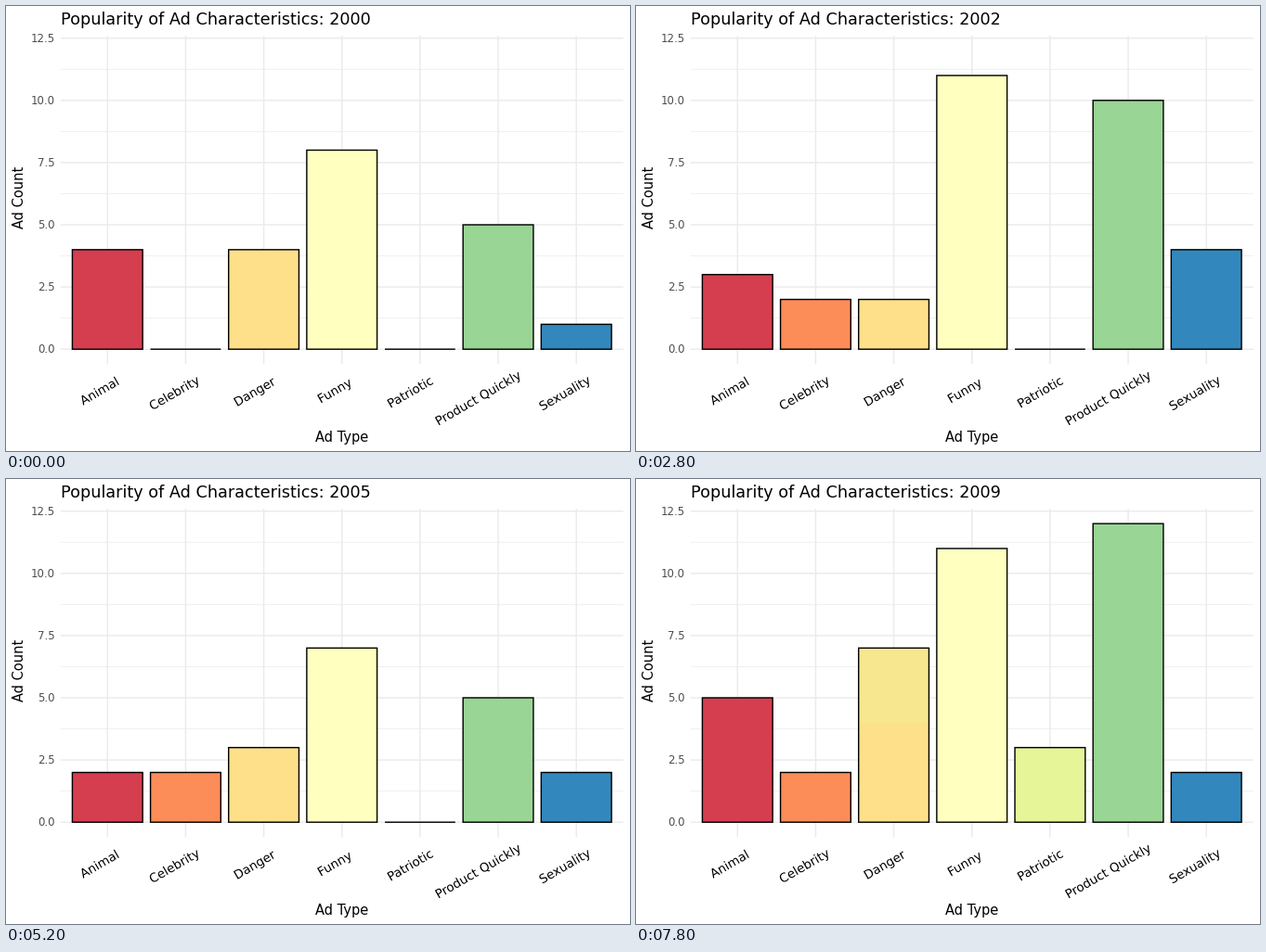
These frames come from a looping animation (672 px wide and 480 px high, 8000 ms). A matplotlib script:

```python
import matplotlib.pyplot as plt
from matplotlib.animation import FuncAnimation
from matplotlib.patches import PathPatch, Rectangle
from matplotlib.textpath import TextPath
from matplotlib.transforms import Affine2D

W, H, DPI = 672, 480, 96
PX = 72 / DPI
STEP, LOOP = 200, 8000
LEFT, RIGHT, TOP, BOTTOM = 58.8, 664.7, 32, 386.3
ZERO, UNIT = 370.2, 26.84
PITCH = (RIGHT - LEFT) / 7.2
BAR = 0.9 * PITCH

TYPES = ["Animal", "Celebrity", "Danger", "Funny", "Patriotic",
         "Product Quickly", "Sexuality"]
COLORS = ["#D53E4F", "#FC8D59", "#FEE08B", "#FFFFBF", "#E6F598",
          "#99D594", "#3288BD"]
# start of the bars, start of the year in the title, ad counts
YEARS = [
    (0, 0, (4, 0, 4, 8, 0, 5, 1)),
    (1000, 1200, (3, 6, 4, 10, 1, 4, 6)),
    (2000, 2000, (3, 2, 3, 10, 1, 7, 6)),
    (2800, 3000, (3, 2, 2, 11, 0, 10, 4)),
    (3600, 3800, (6, 2, 4, 10, 1, 7, 4)),
    (4400, 4600, (6, 1, 4, 11, 0, 7, 3)),
    (5200, 5400, (2, 2, 3, 7, 0, 5, 2)),
    (6000, 6200, (4, 3, 4, 11, 2, 8, 3)),
    (6800, 7000, (3, 5, 4, 11, 3, 11, 4)),
    (7600, 7800, (5, 2, 7, 11, 3, 12, 2)),
]
# start, end, bar, lower and upper count, color of a freshly grown part
TINTS = [(6800, 7000, 4, 2, 3, "#FEE591"), (7600, 8000, 2, 4, 7, "#F7E78F")]

plt.rcParams["font.family"] = "DejaVu Sans"
fig = plt.figure(figsize=(W / DPI, H / DPI), dpi=DPI, facecolor="white")
ax = fig.add_axes([0, 0, 1, 1])
ax.set_xlim(0, W)
ax.set_ylim(H, 0)
ax.axis("off")


def y_of(count):
    return ZERO - UNIT * count


def x_of(index):
    return LEFT + PITCH * (0.6 + index)


def label(x, y, text, size, color="black", ha="left", **kw):
    return ax.text(x, y, text, fontsize=size * PX, color=color, ha=ha,
                   va="baseline", **kw)


def grid_line(xs, ys, width):
    ax.plot(xs, ys, color="#EBEBEB", lw=width * PX, solid_capstyle="butt",
            snap=False, zorder=1)


def slanted_label(x, y, text):
    path = TextPath((0, 0), text, size=13.33)
    length = path.get_extents().x1 + 0.5
    place = (Affine2D().translate(-0.75 * length, 0).rotate_deg(30)
             .scale(1, -1).translate(x, y))
    ax.add_patch(PathPatch(path, fc="black", lw=0,
                           transform=place + ax.transData))


def add_bar(index, zorder, **style):
    return ax.add_patch(Rectangle((x_of(index) - BAR / 2, ZERO), BAR, 0,
                                  zorder=zorder, snap=False,
                                  joinstyle="miter", **style))


def span(bar, low, high):
    bar.set_y(y_of(high))
    bar.set_height(y_of(low) - y_of(high))


for k in range(5):
    y = y_of(1.25 + 2.5 * k)
    grid_line((LEFT, RIGHT), (y, y), 0.71)
for k in range(6):
    y = y_of(2.5 * k)
    grid_line((LEFT, RIGHT), (y, y), 1.42)
    label(52.4, y + 4.3, f"{2.5 * k:.1f}", 11.73, "#4D4D4D", "right")
for i, name in enumerate(TYPES):
    grid_line((x_of(i), x_of(i)), (TOP, BOTTOM), 1.42)
    slanted_label(x_of(i) + 3.2, 413.8, name)

title = label(LEFT, 20, "", 17.6)
label((LEFT + RIGHT) / 2, 470, "Ad Type", 14.67, ha="center")
label(18.6, 206.5, "Ad Count", 14.67, ha="center", rotation=90,
      rotation_mode="anchor")

fills = [add_bar(i, 2, fc=c, lw=0) for i, c in enumerate(COLORS)]
tints = [add_bar(t[2], 3, fc=t[5], lw=0) for t in TINTS]
outlines = [add_bar(i, 4, fill=False, ec="black", lw=1.42 * PX)
            for i in range(len(TYPES))]


def update(frame):
    now = frame * STEP
    counts = [c for start, _, c in YEARS if start <= now][-1]
    passed = sum(start <= now for _, start, _ in YEARS)
    title.set_text(f"Popularity of Ad Characteristics: {1999 + passed}")
    for fill, outline, count in zip(fills, outlines, counts):
        span(fill, 0, count)
        span(outline, 0, count)
    for patch, (start, end, _, low, high, _) in zip(tints, TINTS):
        patch.set_visible(start <= now < end)
        span(patch, low, high)
    return [title, *fills, *tints, *outlines]


anim = FuncAnimation(fig, update, frames=LOOP // STEP, interval=STEP,
                     repeat=True, repeat_delay=0)
plt.show()
```
